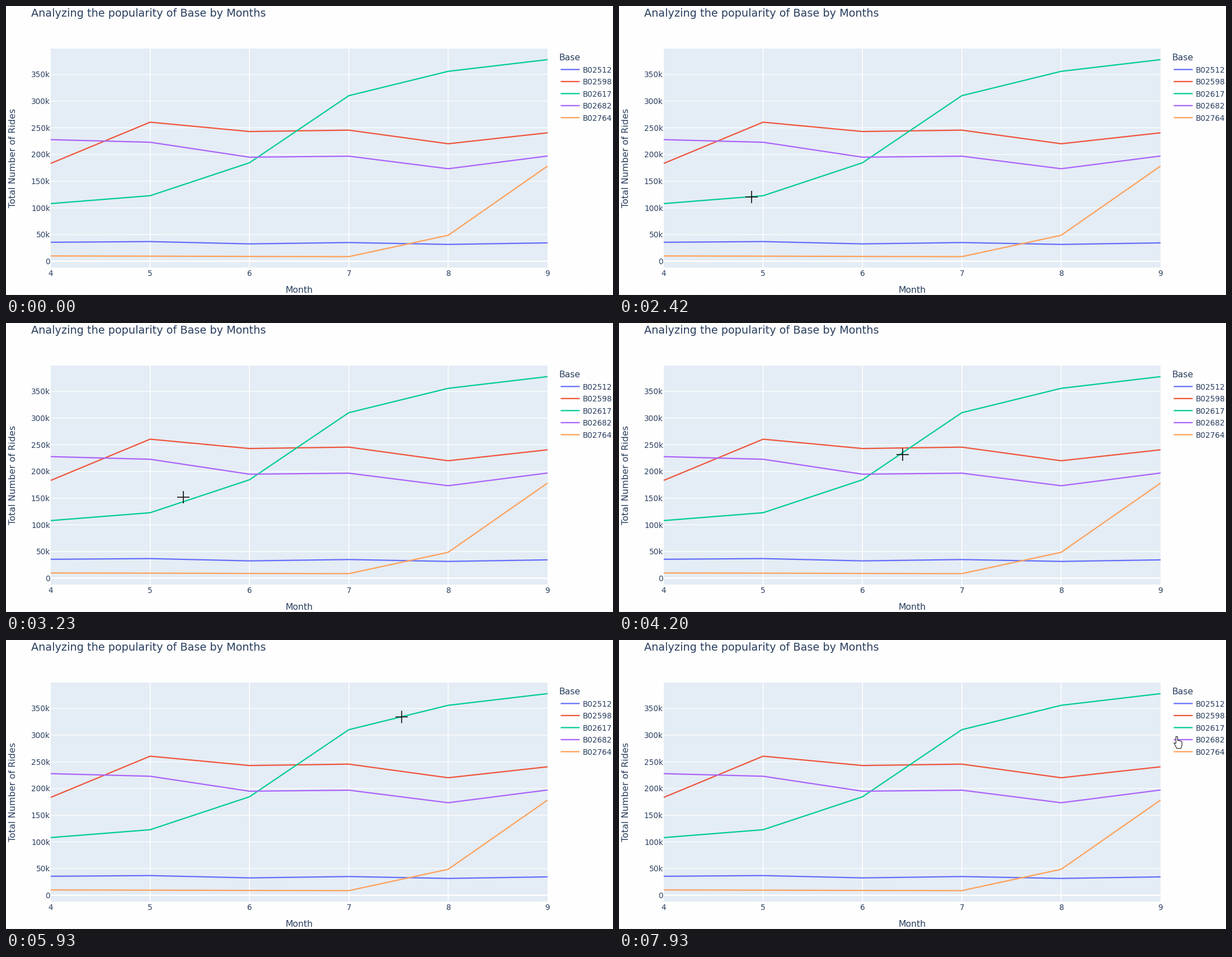
Write a matplotlib script that moves like this. It is 1085 px wide and 516 px high and loops after 8000 ms.

```python
import math

import matplotlib.pyplot as plt
from matplotlib.animation import FuncAnimation
from matplotlib.patches import Polygon, Rectangle

W, H, DPI = 1085, 516, 64
LOOP, STEP = 8000, 20
INK, PLOT_BG = "#2a3f5f", "#e4ecf5"
LEFT, RIGHT, TOP, BOTTOM = 80, 968, 76, 467
MONTHS = range(4, 10)

# Rides per month, in thousands
SERIES = {
    "B02512": ("#636efa", [35.5, 36.8, 32.5, 35, 31.5, 34.4]),
    "B02598": ("#ef553b", [183.3, 260.5, 243, 245.6, 220.1, 240.6]),
    "B02617": ("#00cc96", [108.001, 122.734, 184.46, 310.16, 355.803, 377.695]),
    "B02682": ("#ab63fa", [227.8, 222.9, 194.9, 196.8, 173.3, 197.1]),
    "B02764": ("#ffa15a", [9.9, 9.5, 9, 8.6, 48.6, 178.3]),
}

# Pointer moves: leave, arrive, x, y; it rests in between
START = (23, 362)
MOVES = [
    (1190, 1610, 82, 352), (1870, 2420, 237, 341), (2760, 3230, 317, 311),
    (3230, 3790, 436, 283), (3990, 4200, 507, 235), (4200, 4820, 583, 168),
    (4820, 5030, 597, 163), (5430, 6270, 786, 119), (6360, 6700, 949, 107),
    (6700, 6910, 971, 98), (7110, 7390, 979, 98), (7720, 7930, 997, 172),
]
TICK = 70          # time between two pointer positions
HOVER_LAG = 60
HOVER_REACH = 22

ARROW = [(0, 0), (0, 15), (3.5, 12), (6, 17), (8, 16), (5.7, 11), (11, 11)]
HAND = [(-1.5, 0.5), (1.5, 0.5), (1.5, 7), (9, 9), (9.5, 15), (7.5, 21.5),
        (0, 21.5), (-5, 12), (-1.5, 12.5)]


def pt(px):
    return px * 72 / DPI


def month_x(m):
    return LEFT + (m - 4) * (RIGHT - LEFT) / 5


def rides_y(thousands):
    return 455.7 - thousands * 0.953


fig = plt.figure(figsize=(W / DPI, H / DPI), dpi=DPI, facecolor="#fefefe")
ax = fig.add_axes([0, 0, 1, 1])
ax.set_xlim(0, W)
ax.set_ylim(H, 0)
ax.axis("off")


def line(xs, ys, color, width, **kw):
    kw = {"solid_capstyle": "butt", "solid_joinstyle": "miter",
          "snap": False, **kw}
    return ax.plot(xs, ys, color=color, lw=pt(width), **kw)[0]


def text(x, y, s, size, color=INK, font="DejaVu Sans", **kw):
    return ax.text(x, y, s, fontsize=pt(size), color=color, family=font,
                   va="baseline", **kw)


def draw_chart():
    ax.add_patch(Rectangle((LEFT, TOP), RIGHT - LEFT, BOTTOM - TOP,
                           fc=PLOT_BG, ec="none"))
    for m in MONTHS:
        if 4 < m < 9:
            line([month_x(m)] * 2, [TOP, BOTTOM], "white", 1.7)
        text(month_x(m), 482, str(m), 13.6, ha="center")
    for k in range(0, 400, 50):
        y = rides_y(k)
        line([LEFT, RIGHT], [y, y], "white", 1.3 if k else 2.4)
        text(79, y + 5.3, f"{k}k" if k else "0", 13.6, ha="right")

    text(988, 97, "Base", 15.8)
    for i, (name, (color, values)) in enumerate(SERIES.items()):
        line([month_x(m) for m in MONTHS], [rides_y(v) for v in values],
             color, 2.25)
        y = 113.4 + 21.5 * i
        line([991.5, 1025.5], [y, y], color, 2.25)
        text(1030.7, y + 5.4, name, 13.6)

    text(45, 19, "Analyzing the popularity of Base by Months", 19.25)
    text(524, 512, "Month", 15.8, ha="center")
    text(17.5, 271.5, "Total Number of Rides", 15.95, ha="center",
         rotation=90, rotation_mode="anchor")
    line([0, W], [515.5, 515.5], "#ebebeb", 1, linestyle=(0, (4, 3)))


draw_chart()

tip_box = ax.add_patch(Polygon([(0, 0), (1, 0), (1, 1)], ec="#444444",
                               lw=pt(1.1), zorder=5))
tip_rows = [text(0, 0, "", 14.63, "#444444", "Liberation Sans", zorder=6)
            for _ in range(3)]
cross = line([], [], "#141414", 1.7, zorder=8)
pointer = ax.add_patch(Polygon(ARROW, fc="white", ec="#1a1a1a", lw=pt(1.1),
                               joinstyle="round", zorder=8))


def pointer_at(t):
    """Pointer place at time t, advancing in ticks; None before it enters."""
    if t < MOVES[0][0]:
        return None
    x, y = START
    for leave, arrive, to_x, to_y in MOVES:
        if t < leave:
            break
        n = round((arrive - leave) / TICK)
        f = min(1, math.floor((t - leave) / (arrive - leave) * n) / n)
        x, y = x + (to_x - x) * f, y + (to_y - y) * f
    return x, y


def over_plot(place):
    return place is not None and LEFT <= place[0] <= RIGHT


def hovered(place):
    """Series name and month of the nearest data point within reach."""
    if not over_plot(place):
        return None
    dist, name, month = min(
        (math.dist(place, (month_x(m), rides_y(v))), name, m)
        for name, (_, values) in SERIES.items()
        for m, v in zip(MONTHS, values))
    return (name, month) if dist < HOVER_REACH else None


def show_pointer(place):
    inside = over_plot(place)
    cross.set_visible(inside)
    pointer.set_visible(place is not None and not inside)
    if place is None:
        return
    x, y = place
    if inside:
        cross.set_data([x - 11, x + 11, math.nan, x, x],
                       [y, y, math.nan, y - 11, y + 11])
    else:
        over_legend = x > RIGHT and y > 105
        shape = HAND if over_legend else ARROW
        pointer.set_xy([(x + dx, y + dy) for dx, dy in shape])


def show_tip(tip):
    for part in (tip_box, *tip_rows):
        part.set_visible(tip is not None)
    if tip is None:
        return
    name, month = tip
    color, values = SERIES[name]
    rides = values[month - 4]
    amount = f"{rides:g}k"
    x, y = month_x(month), rides_y(rides)
    side = -1 if month == MONTHS[-1] else 1
    width = 215 + 8.1 * (len(amount) - 7)
    near = x + side * 7.7
    far = near + side * width
    tip_box.set_xy([(x + side, y), (near, y - 6.75), (near, y - 30.7),
                    (far, y - 30.7), (far, y + 30.7), (near, y + 30.7),
                    (near, y + 6.75)])
    tip_box.set_facecolor(color)
    rows = (f"Base={name}", f"Month={month}",
            f"Total Number of Rides={amount}")
    for i, (row, label) in enumerate(zip(tip_rows, rows)):
        row.set_text(label)
        row.set_position((min(near, far) + 3.4, y - 14 + 19.3 * i))


def update(i):
    t = i * STEP + STEP / 2
    show_tip(hovered(pointer_at(t - HOVER_LAG)))
    show_pointer(pointer_at(t))
    return [tip_box, *tip_rows, cross, pointer]


anim = FuncAnimation(fig, update, frames=LOOP // STEP, interval=STEP,
                     repeat=True, repeat_delay=0, blit=False)
plt.show()
```
